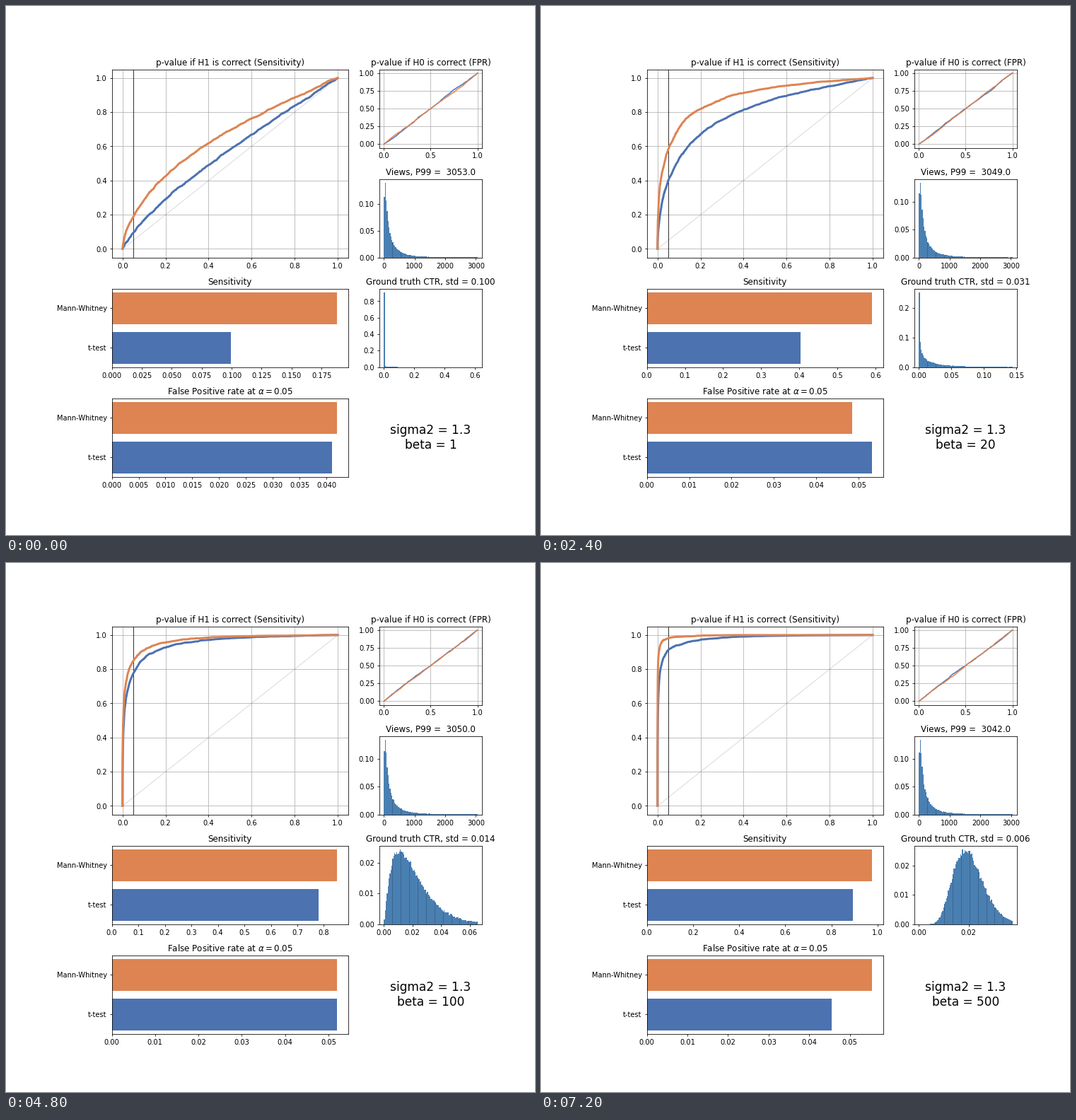
Write a matplotlib script that moves like this. It is 748 by 748 pixels and loops after 8000 ms.

```python
import math

import numpy as np
import matplotlib.pyplot as plt
from matplotlib.animation import FuncAnimation

BLUE, ORANGE, STEEL = "#4c72b0", "#dd8452", "#4a7fb2"
BETAS = [1, 5, 10, 20, 40, 80, 100, 150, 200, 500]
VIEWS_P99 = [3053, 3051, 3058, 3049, 3056, 3040, 3050, 3061, 3047, 3042]
CTR_ODDS = 0.0209
BINS = 100
TESTS = 2000
USERS = 100_000

erf = np.vectorize(math.erf)


def phi(z):
    return 0.5 * (1 + erf(np.asarray(z) / math.sqrt(2)))


Z = np.linspace(6, 0, 1500)
LEVEL = 2 * phi(-Z)
X = np.linspace(0, 1, 500) ** 2


def power(shift, z):
    """Chance that a two-sided z-test with a shifted mean rejects at z."""
    return phi(shift - z) + phi(-shift - z)


def effect_sizes(beta):
    """Shift of the t-test and Mann-Whitney statistics, growing with log beta."""
    size = math.log10(beta)
    t_shift = 0.55 + 2.8 / (1 + math.exp(-2.3 * (size - 1.448)))
    mw_shift = 1.07 + 0.671 * size + 0.146 * size**2
    return t_shift, mw_shift


def false_positives(beta):
    size = math.log10(beta)
    return 0.041 + 0.0055 * size * (3 - size), 0.042 + 0.005 * size


def roughen(curve, rng, knots):
    """Add the local jitter of an empirical CDF, pinned at evenly spaced knots."""
    steps = rng.normal(size=X.size - 1) * np.sqrt(np.diff(curve).clip(0) / TESTS)
    walk = np.concatenate([[0], np.cumsum(steps)])
    pins = np.linspace(0, 1, knots)
    walk -= np.interp(X, pins, np.interp(pins, X, walk))
    return np.maximum.accumulate(np.clip(curve + walk, 0, 1))


def power_curve(shift, rng):
    curve = np.interp(X, LEVEL, power(shift, Z))
    curve[0] = 0
    return roughen(curve, rng, 11)


def views_hist(p99):
    edges = np.linspace(0, p99, BINS + 1)
    cuts = np.ceil(edges[1:]) - 0.5  # views are whole numbers
    cdf = phi((np.log(cuts) - 5) / 1.3)
    return edges, np.diff(cdf, prepend=0)


def ctr_hist(a, b):
    """Beta distribution up to its 99th percentile."""
    x = np.geomspace(1e-12, 1 - 1e-9, 20000)
    mass = x**a * (1 - x) ** (b - 1)
    area = np.cumsum((mass[1:] + mass[:-1]) / 2 * np.diff(np.log(x)))
    cdf = np.concatenate([[0], area]) + x[0] ** a / a
    cdf /= cdf[-1]
    edges = np.linspace(0, np.interp(0.99, cdf, x), BINS + 1)
    return edges, np.diff(np.interp(edges[1:], x, cdf), prepend=0)


def beta_std(a, b):
    return math.sqrt(a * b / (a + b + 1)) / (a + b)


def draw_curves(ax, curves, title, width):
    for curve, color in zip(curves, (BLUE, ORANGE)):
        ax.plot(X, curve, color=color, lw=width)
    ax.set_title(title)
    ax.grid(True)


def draw_hist(ax, edges, share, title, rng):
    share = share / share.sum()
    share = (share + rng.normal(size=BINS) * np.sqrt(share / USERS)).clip(0)
    ax.stairs(share, edges, fill=True, color=STEEL, lw=0)
    ax.vlines(edges[9:-1:9], 0, share[9::9], color="black", lw=0.8, alpha=0.25)
    ax.set_title(title)


def draw_bars(ax, values, title):
    ax.barh(["t-test", "Mann-Whitney"], values, color=[BLUE, ORANGE])
    ax.set_title(title)


fig = plt.figure(figsize=(10.5, 10.5), dpi=71.24, facecolor="white")
grid = fig.add_gridspec(4, 3, left=0.2, right=0.9, bottom=0.11, top=0.88,
                        wspace=0.3, hspace=0.4)
cells = [grid[:2, :2], grid[0, 2], grid[1, 2], grid[2, 2],
         grid[2, :2], grid[3, :2], grid[3, 2]]
axes = [fig.add_subplot(cell) for cell in cells]
h1_ax, h0_ax, views_ax, ctr_ax, power_ax, fpr_ax, note_ax = axes


def update(i):
    beta, p99 = BETAS[i], VIEWS_P99[i]
    shifts = effect_sizes(beta)
    a, b = CTR_ODDS * beta, beta
    rng = np.random.default_rng(40 + i)
    for ax in axes:
        ax.clear()

    h1_ax.plot([0, 1], [0, 1], color="black", lw=1, alpha=0.15)
    h1_ax.axvline(0.05, color="black", lw=1, alpha=0.8)
    draw_curves(h1_ax, [power_curve(s, rng) for s in shifts],
                "p-value if H1 is correct (Sensitivity)", 3)
    draw_curves(h0_ax, [roughen(X, rng, 3) for _ in shifts],
                "p-value if H0 is correct (FPR)", 1.5)

    draw_hist(views_ax, *views_hist(p99), f"Views, P99 =  {p99:.1f}", rng)
    draw_hist(ctr_ax, *ctr_hist(a, b),
              f"Ground truth CTR, std = {beta_std(a, b):.3f}", rng)

    draw_bars(power_ax, [float(power(s, 1.96)) for s in shifts], "Sensitivity")
    draw_bars(fpr_ax, false_positives(beta),
              r"False Positive rate at $\alpha=0.05$")

    note_ax.axis("off")
    note_ax.text(0.5, 0.5, f"sigma2 = 1.3\nbeta = {beta}",
                 size="xx-large", ha="center", va="center")
    return []


anim = FuncAnimation(fig, update, frames=len(BETAS), interval=800,
                     repeat=True, repeat_delay=0)
plt.show()
```
